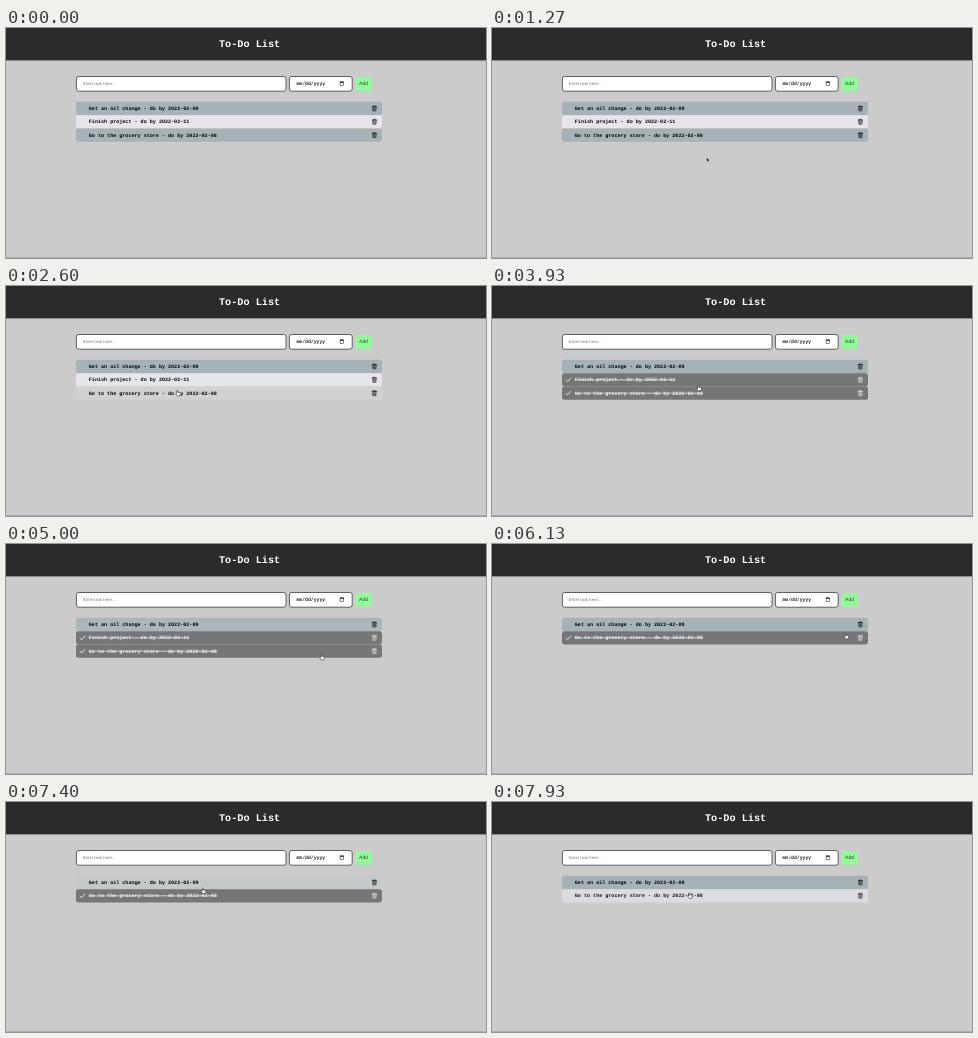
An HTML page for the animation above (8 s loop, 480x230 px).

```html
<!DOCTYPE html>
<html lang="en">
<head>
<meta charset="utf-8">
<title>To-Do List</title>
<style>
  html, body { margin: 0; width: 100%; height: 100%; overflow: hidden; background: #cbcbcb; }
  svg { display: block; width: 100vw; height: 100vh; }
  text { text-rendering: geometricPrecision; white-space: pre; }
  .mono { font-family: "Liberation Mono", "Courier New", monospace; font-weight: 700; }
  .sans { font-family: "Liberation Sans", Arial, sans-serif; }
  .line { fill: none; stroke: currentColor; stroke-linecap: round; stroke-linejoin: round; }
</style>
</head>
<body>
<svg viewBox="0 0 480 230">
  <defs>
    <path id="trash" class="line" stroke-width=".6"
      d="M-2.2 -1.7H2.2M-.8 -1.8V-2.5H.8V-1.8M-1.7 -1.6L-1.5 2.5H1.5L1.7 -1.6M-.5 -.5V1.4M.5 -.5V1.4"/>
    <path id="tick" class="line" stroke-width=".9" d="M-2.4 .3L-.8 1.9L2.5 -1.8"/>
  </defs>

  <rect width="480" height="230" fill="#cbcbcb"/>
  <rect width="480" height="32.4" fill="#2b2b2b"/>
  <rect y="229" width="480" height="1" fill="#acacac"/>
  <text class="mono" x="213" y="18.8" font-size="10.2" fill="#fff">To-Do List</text>

  <g fill="#fff" stroke="#333" stroke-width=".75">
    <rect x="70.4" y="48.5" width="209.6" height="14.7" rx="2.3"/>
    <rect x="283.4" y="48.5" width="62.8" height="14.7" rx="2.3"/>
  </g>
  <text class="sans" x="77" y="57.2" font-size="4.25" fill="#757575">Enter task here...</text>
  <text class="mono" x="290.4" y="57.2" font-size="4.8" fill="#222">mm/dd/yyyy</text>
  <g fill="none" stroke="#222" stroke-width=".55">
    <rect x="334.1" y="53.9" width="3.6" height="3.7"/>
    <path d="M334.1 54.5H337.7M334.9 53.2V54M336.9 53.2V54" stroke-width=".8"/>
  </g>
  <rect x="349" y="48.7" width="16.6" height="13.9" rx="2" fill="#90fb98"/>
  <text class="sans" x="353.1" y="57.2" font-size="5" fill="#2b4a30">Add</text>

  <g id="list"></g>

  <g id="cursor" stroke-linejoin="round">
    <path id="hand" fill="#fff" stroke="#222" stroke-width=".55"
      d="M-1.1 -2.4Q-.6 -3.2 -.2 -2.4V-.8L1.8 -.4Q2.5 -.2 2.4 .5L1.8 2.8H-.9L-2.4 .7Q-2.3 -.1 -1.1 .5Z"/>
    <path id="arrow" fill="#111" stroke="#fff" stroke-width=".5"
      d="M-1.6 -3V1.9L-.5 1L.3 2.8L1.1 2.4L.4 .7H1.9Z"/>
  </g>
</svg>
<script>
const LOOP = 8000, APPEAR = 200, REMOVE = 5870;
const FADE = 300, STEPS = 30, LAG = 40;
const LEFT = 70, WIDTH = 306, TOP = 73.8, ROW = 13.35;
const $ = id => document.getElementById(id);

// background and text colour of each row state
const STYLE = {
  odd:  [[166, 179, 182], [0, 0, 0]],
  even: [[232, 229, 234], [0, 0, 0]],
  over: [[212, 212, 212], [0, 0, 0]],
  done: [[118, 118, 118], [236, 236, 236]]
};

// each click toggles a task
const tasks = [
  { text: "Get an oil change - do by 2022-02-09", clicks: [] },
  { text: "Finish project - do by 2022-02-11", clicks: [3600] },
  { text: "Go to the grocery store - do by 2022-02-08", clicks: [2870, 7730] }
];

// pointer moves: start, end, target x and y
const origin = [335, 203];
const moves = [
  [150, 400, 335, 191],
  [740, 1270, 216, 132],
  [1410, 1700, 185, 110],
  [1800, 2040, 174, 94],
  [2270, 2450, 172, 107],
  [2900, 3400, 205, 97],
  [3680, 3930, 207, 102],
  [3930, 4470, 195, 53],
  [4470, 5000, 316, 113],
  [5200, 5730, 368, 94],
  [6070, 6300, 290, 83],
  [6300, 6600, 193, 94],
  [6600, 6930, 193, 53],
  [6930, 7530, 198, 93.5]
];

const clamp = x => Math.max(0, Math.min(1, x));
const smooth = x => x * x * (3 - 2 * x);
const mix = (a, b, k) => a.map((v, i) => v + (b[i] - v) * k);
const rgb = c => `rgb(${c.map(Math.round)})`;

const pointer = t => moves.reduce((pos, [from, to, ...target]) =>
  mix(pos, target, smooth(clamp((t - from) / (to - from)))), origin);

const removed = t => t >= REMOVE;
const slotOf = (i, t) => removed(t) && i > 1 ? i - 1 : i;
const isDone = (i, t) => tasks[i].clicks.filter(c => c <= t).length % 2 === 1;

// index of the list slot under the pointer, or -1
function slotUnder([x, y], t) {
  const slot = Math.floor((y - TOP) / ROW);
  const count = tasks.length - removed(t);
  return x > LEFT && x < LEFT + WIDTH && slot >= 0 && slot < count ? slot : -1;
}

function stateAt(i, t) {
  if (isDone(i, t)) return "done";
  const slot = slotOf(i, t);
  if (slot % 2) return "even";
  return slotUnder(pointer(t - LAG), t) === slot ? "over" : "odd";
}

// ease-out fade: weighted mean of the states over the last FADE ms
function rowColors(i, t) {
  const sum = [[0, 0, 0], [0, 0, 0]];
  for (let n = 0; n < STEPS; n++) {
    const weight = (2 * (STEPS - n) - 1) / STEPS ** 2;
    const style = STYLE[stateAt(i, t - n * FADE / STEPS)];
    style.forEach((color, j) => color.forEach((v, k) => sum[j][k] += v * weight));
  }
  return sum.map(rgb);
}

$("list").innerHTML = tasks.map(({ text }) => `
  <g>
    <rect x="${LEFT}" width="${WIDTH}" height="${ROW}" rx="2.4"/>
    <text class="mono" x="82.8" y="8.3" font-size="5.09" fill="currentColor">${text}</text>
    <g class="marks">
      <path d="M82.8 6.7h${text.length * 3.054}" stroke="currentColor" stroke-width=".7"/>
      <use href="#tick" x="76.4" y="6.6"/>
    </g>
    <use href="#trash" x="368.4" y="6.6"/>
  </g>`).join("");

const rows = [...$("list").children];
const show = (el, on) => el.setAttribute("display", on ? "inline" : "none");

function draw(t) {
  rows.forEach((row, i) => {
    const [bg, fg] = rowColors(i, t);
    row.setAttribute("transform", `translate(0 ${TOP + slotOf(i, t) * ROW})`);
    row.style.color = fg;
    row.firstElementChild.setAttribute("fill", bg);
    show(row.querySelector(".marks"), isDone(i, t));
    show(row, !(removed(t) && i === 1));
  });

  const pos = pointer(t), onList = slotUnder(pos, t) >= 0;
  $("cursor").setAttribute("transform", `translate(${pos})`);
  show($("cursor"), t >= APPEAR);
  show($("hand"), onList);
  show($("arrow"), !onList);
}

const start = performance.now();
function frame() {
  draw((performance.now() - start) % LOOP);
  requestAnimationFrame(frame);
}
frame();
</script>
</body>
</html>
```
